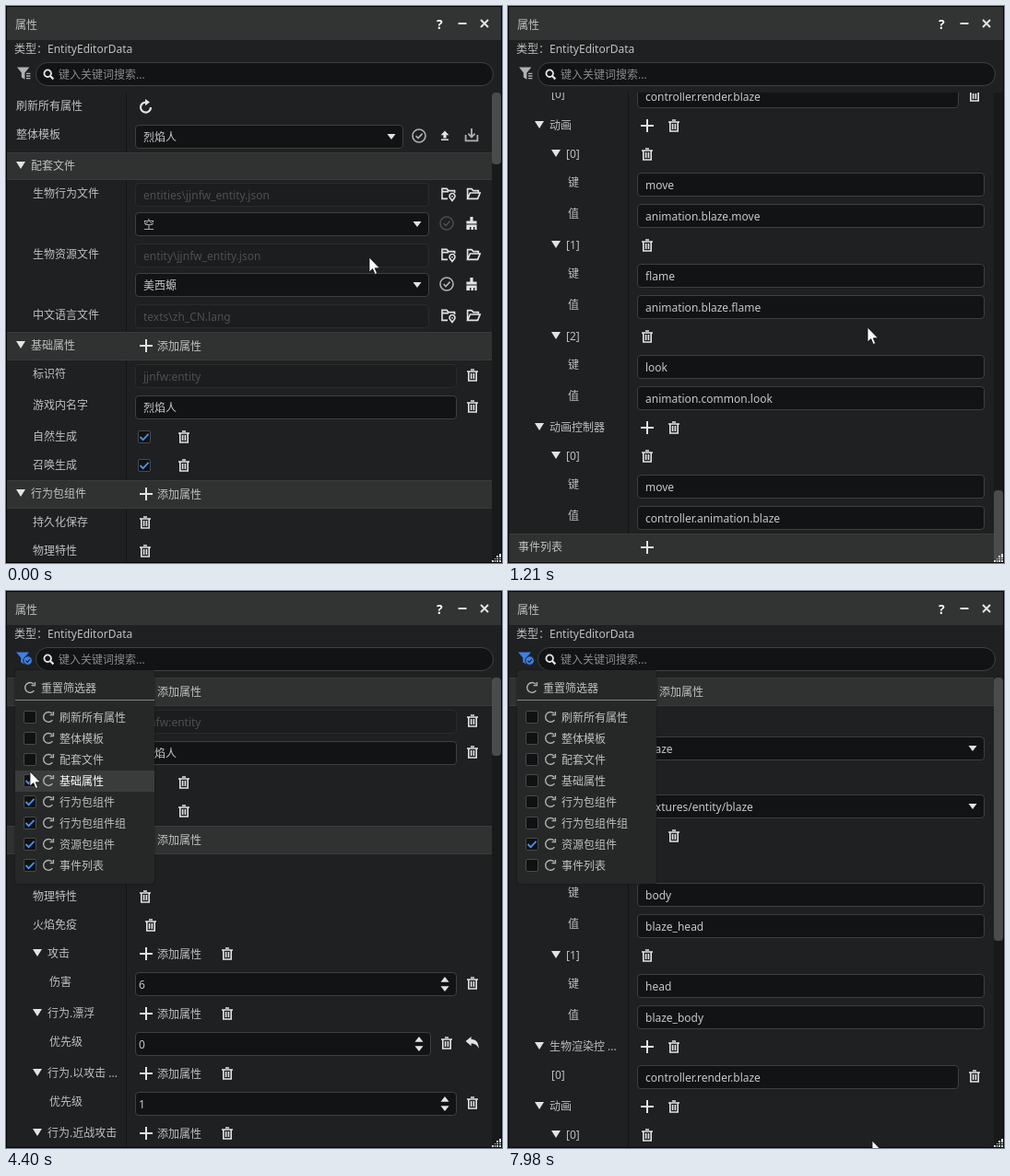
Write an HTML page that moves like this. It is 538 by 605 pixels and loops after 8 s.

```html
<!DOCTYPE html>
<html lang="zh-CN">
<head>
<meta charset="utf-8">
<title>属性</title>
<style>
html, body { margin: 0; width: 100%; height: 100%; overflow: hidden; background: #000; }
body { font: 12px/29px "Noto Sans", "Noto Sans CJK SC", "Noto Sans CJK", sans-serif; color: #bfc0c0; }
#stage { position: relative; width: 538px; height: 605px; overflow: hidden; background: #1e2021; }
#stage div, #stage span, #stage svg { position: absolute; box-sizing: border-box; white-space: nowrap; }
#frame { inset: 0; border: 1px solid #050606; }
#bar { left: 1px; top: 1px; width: 536px; height: 36px; background: #323333; }
#search { left: 32px; top: 61px; width: 497px; height: 26px; border: 1px solid #404242; border-radius: 13px; background: #121314; color: #8a8c8c; line-height: 25px; padding-left: 24px; }
#view { left: 1px; top: 94px; width: 536px; height: 510px; overflow: hidden; }
#list { left: -1px; top: 0; width: 528px; }
#list .group, #list .row { position: relative; }
#list .row::before { content: ""; position: absolute; left: 130px; top: 0; bottom: 0; width: 1px; background: #131515; }
#list .head { background: #303131; box-shadow: inset 0 1px #3a3b3b, inset 0 -1px #3a3b3b; }
#list .head::before { display: none; }
#track { left: 526px; top: 0; width: 10px; height: 510px; background: #181a1a; }
#thumb { left: 0; top: 0; width: 10px; border-radius: 4px; background: #4a4b4b; }
.field { left: 140px; height: 26px; border: 1px solid #3e4040; border-radius: 4px; background: #121314; color: #c6c8c8; line-height: 25px; padding-left: 8px; }
.field.spin { padding-left: 3px; }
.field.off { background: #1b1d1e; border-color: #292b2b; color: #4e5050; }
.box { width: 14px; height: 14px; border: 1px solid #484a4a; border-radius: 2px; background: #101112; color: #4a90f0; }
.box.clear svg { display: none; }
.i { width: 20px; height: 20px; fill: none; stroke: currentColor; stroke-width: 1.6; color: #e2e3e3; overflow: visible; }
.i.dim { color: #4b4d4d; }
.i.mid { color: #b0b2b2; }
.box .i { color: inherit; }
#menu { left: 10px; top: 86px; width: 151px; height: 232px; border-radius: 4px; background: #262827; box-shadow: 0 0 2px #111; }
#menu .rule { left: 0; top: 32px; width: 151px; height: 1px; background: #858787; }
.item { left: 0; width: 151px; height: 23px; line-height: 24px; }
.item.hot { background: #3a3c3c; color: #fff; }
#spot { width: 24px; height: 24px; border-radius: 50%; background: rgba(216, 206, 28, .72); }
</style>
</head>
<body>
<div id="stage"></div>
<svg width="0" height="0" style="position:absolute">
  <defs>
    <symbol id="trash" viewBox="-10 -10 20 20"><path d="M-2-6H2M-6-4H6M-4.2-4V6H4.2V-4M-1.4-2V4M1.4-2V4"/></symbol>
    <symbol id="plus" viewBox="-10 -10 20 20"><path d="M-7 0H7M0-7V7" stroke-width="2"/></symbol>
    <symbol id="refresh" viewBox="-10 -10 20 20"><path d="M1-4.4A5.5 5.5 0 1 0 6 1" stroke-width="2.2"/><path d="M0-8L5-4.4 0-.8Z" fill="currentColor" stroke="none"/></symbol>
    <symbol id="reset" viewBox="-10 -10 20 20"><path d="M4-3.8A5.4 5.4 0 1 0 4.4 3.2M5.4-6V-2.4H1.6" stroke-width="1.4"/></symbol>
    <symbol id="fold" viewBox="-10 -10 20 20"><path d="M-5-4H5L0 4Z" fill="currentColor" stroke="none"/></symbol>
    <symbol id="down" viewBox="-10 -10 20 20"><path d="M-4.5-3H4.5L0 3Z" fill="currentColor" stroke="none"/></symbol>
    <symbol id="steps" viewBox="-10 -10 20 20"><path d="M-4.5-2.2L0-8 4.5-2.2ZM-4.5 2.2L0 8 4.5 2.2Z" fill="currentColor" stroke="none"/></symbol>
    <symbol id="tick" viewBox="-10 -10 20 20"><path d="M-4.5 0L-1.4 3.2 4.6-3.2" stroke-width="1.8"/></symbol>
    <symbol id="okay" viewBox="-10 -10 20 20"><circle r="7"/><path d="M-3.4 0L-1 2.6 3.6-2.4"/></symbol>
    <symbol id="up" viewBox="-10 -10 20 20"><path d="M0-5.4L4.4-.8H1.6V2.4H-1.6V-.8H-4.4ZM-4 3.6H4V5H-4Z" fill="currentColor" stroke="none"/></symbol>
    <symbol id="save" viewBox="-10 -10 20 20"><path d="M-6.4-1V5.4H6.4V-1M0-8V1M-3.6-2.4L0 1.4 3.6-2.4" stroke-width="1.8"/></symbol>
    <symbol id="place" viewBox="-10 -10 20 20"><path d="M-1 5.4H-7V-5.6H-2L0-3.4H6.6V-1M-7-2.4H0"/><path d="M4 7.4L1.4 4A3 3 0 1 1 6.6 4ZM4 2V3.4"/></symbol>
    <symbol id="open" viewBox="-10 -10 20 20"><path d="M-6.4 5.4V-5.4H-2L0-3.4H5.4V-1M-6.4 5.4L-3.6-1H7.2L4.6 5.4Z"/></symbol>
    <symbol id="brush" viewBox="-10 -10 20 20"><path d="M-1.6-7H1.6V-2.4H5.6V.4H-5.6V-2.4H-1.6ZM-5.6 1.4H5.6V7H3.4V4H2V7H-.6V4H-2V7H-5.6Z" fill="currentColor" stroke="none"/></symbol>
    <symbol id="undo" viewBox="-10 -10 20 20"><path d="M-7.4-2L-1.4-7V-4C4-4 6.6-.6 6.8 6 5 2 2.6.4-1.4.4V3.2Z" fill="currentColor" stroke="none"/></symbol>
    <symbol id="lens" viewBox="-10 -10 20 20"><circle cx="-.8" cy="-.8" r="3.8" stroke-width="1.8"/><path d="M2 2L5.4 5.4" stroke-width="2.2"/></symbol>
    <symbol id="minus" viewBox="-10 -10 20 20"><path d="M-4.5 0H4.5" stroke-width="2"/></symbol>
    <symbol id="close" viewBox="-10 -10 20 20"><path d="M-4-4L4 4M4-4L-4 4" stroke-width="2"/></symbol>
    <symbol id="funnel" viewBox="-10 -10 20 20"><path d="M-7-6.6H6.4L1.4-.6V6.8L-2.2 4.4V-.6Z" fill="currentColor" stroke="none"/><path d="M3 .4H7.4M3 3H7.4M3 5.6H7.4" stroke-width="1.4"/></symbol>
    <symbol id="filtered" viewBox="-10 -10 20 20"><path d="M-8-6.6H6L1-.6V6.6L-2.8 4.4V-.6Z" fill="currentColor" stroke="none"/><circle cx="4.6" cy="2.6" r="4.8" fill="currentColor" stroke="#1e2021" stroke-width="1"/><path d="M2.4 2.6L4.2 4.4 7 1.2" stroke="#1e2021" stroke-width="1.2"/></symbol>
  </defs>
</svg>
<script>
const at = (x, y) => `left:${x}px;top:${y}px`;
const icon = (name, x, y = 15, cls = '') =>
  `<svg class="i ${cls}" style="${at(x - 10, y - 10)}"><use href="#${name}"/></svg>`;
const text = (s, x, y, css = '') => `<span style="${at(x, y - 14.5)};${css}">${s}</span>`;
const field = (right, s, cls = '', y = 17, mark = '') =>
  `<div class="field ${cls}" style="top:${y - 13}px;width:${right - 140}px">${s}</div>` +
  (mark && icon(mark, right - (mark === 'down' ? 13.5 : 13), y));
const combo = (right, s, y) => field(right, s, '', y, 'down');
const box = (x, y) => `<div class="box" style="${at(x - 7, y - 7)}">${icon('tick', 6, 6)}</div>`;
const trash = (x, y) => icon('trash', x, y);
const addBtn = icon('plus', 152) + text('添加属性', 164, 15.5);

// Rows: a label indented by depth, with or without a fold arrow
const row = (h, depth, label, body = '', fold = false, cls = '') =>
  `<div class="row ${cls}" style="height:${h}px">` +
  (fold ? icon('fold', 16 + 18 * depth, 14) : '') +
  text(label, (fold ? 27 : 11) + 18 * depth, 14.5) + body + '</div>';
const head = (label, body = '', fold = true, h = 31) => row(h, 0, label, body, fold, 'head');
const node = (label, depth = 1, body = addBtn + trash(240)) => row(31, depth, label, body, true);
const array = (label, depth = 1) => node(label, depth, icon('plus', 151) + trash(180));
const leaf = (label, x = 151) => row(31, 1, label, trash(x));
const flag = (label, depth) => row(31, depth, label, box(150, 15) + trash(193));
const edit = (label, depth, s, cls) => row(34, depth, label, field(489, s, cls) + trash(506, 16));
const pick = (label, s) => row(34, 3, label, combo(489, s) + trash(506, 16));
const wide = (label, s) => row(32, 2, label, combo(517, s, 15));
const spin = (label, s, undo) => row(34, 2, label, undo
  ? field(461, s, 'spin', 17, 'steps') + trash(478, 16) + icon('undo', 506, 16)
  : field(489, s, 'spin', 17, 'steps') + trash(506, 16));
const pair = (n, key, val) => node(`[${n}]`, 2, trash(151)) +
  row(34, 3, '键', field(517, key)) + row(34, 3, '值', field(517, val));
const file = (label, path, choice, tint) => row(choice ? 66 : 33, 1, label,
  field(459, path, 'off', 16) + icon('place', 480) + icon('open', 507) +
  (choice ? combo(459, choice, 48) + icon('okay', 478, 47, tint) + icon('brush', 505, 47) : ''));

const chase = ['追赶最 ...', '随机走动', '随机飞行', '看向玩家', '随机张望', '受伤反击', '远程攻击', '返回领地'];
const names = ['刷新所有属性', '整体模板', '配套文件', '基础属性', '行为包组件', '行为包组件组', '资源包组件', '事件列表'];
const groups = [
  row(31, 0, names[0], icon('refresh', 151)),
  row(34, 0, names[1], combo(431, '烈焰人') + icon('okay', 448, 16, 'mid') + icon('up', 476, 16) + icon('save', 505, 16, 'mid')),
  head(names[2], '', true, 30) +
    file('生物行为文件', 'entities\\jjnfw_entity.json', '空', 'dim') +
    file('生物资源文件', 'entity\\jjnfw_entity.json', '美西螈', 'mid') +
    file('中文语言文件', 'texts\\zh_CN.lang'),
  head(names[3], addBtn) + edit('标识符', 1, 'jjnfw:entity', 'off') + edit('游戏内名字', 1, '烈焰人') +
    flag('自然生成', 1) + flag('召唤生成', 1),
  head(names[4], addBtn) + leaf('持久化保存') + leaf('物理特性') + leaf('火焰免疫', 157) +
    node('攻击') + spin('伤害', 6) + node('行为.漂浮') + spin('优先级', 0, true) +
    node('行为.以攻击 ...') + spin('优先级', 1) +
    node('行为.近战攻击') + spin('优先级', 3, true) + spin('随机停止间隔', 2) + spin('移速倍数', '1.00') + flag('追逐目标', 2) +
    chase.map((s, i) => node('行为.' + s) + spin('优先级', i + 2) + spin('移速倍数', '1.00') + flag('追逐目标', 2)).join('') +
    leaf('碰撞箱') + leaf('生命值') +
    row(31, 1, '移动.基础', addBtn + trash(240)) + row(31, 1, '可被命名', addBtn + trash(240)) +
    node('导航.行走') + flag('可以涉水', 2) + node('射手') + edit('定义', 2, 'minecraft:small_fireball') +
    node('科系') + array('科系', 2) + pick('[0]', 'blaze') + pick('[1]', 'monster') + pick('[2]', 'mob'),
  head(names[5], icon('plus', 151), false),
  head(names[6], addBtn) + node('模型', 1, '') + wide('default', 'blaze') +
    node('纹理', 1, '') + wide('default', 'textures/entity/blaze') +
    array('部件显示') + pair(0, 'body', 'blaze_head') + pair(1, 'head', 'blaze_body') +
    array('生物渲染控 ...') + edit('[0]', 2, 'controller.render.blaze') +
    array('动画') + pair(0, 'move', 'animation.blaze.move') + pair(1, 'flame', 'animation.blaze.flame') + pair(2, 'look', 'animation.common.look') +
    array('动画控制器') + pair(0, 'move', 'controller.animation.blaze'),
  head(names[7], icon('plus', 151), false)
];

let grip = '';
for (let r = 0; r < 4; r++)
  for (let c = 0; c <= r; c++)
    grip += `<div style="${at(535 - 2.6 * c, 595 + 2.4 * r)};width:1.5px;height:1.5px;background:#ddd"></div>`;

const stage = document.getElementById('stage');
stage.innerHTML = `
  <div id="bar">${text('属性', 9, 19.5)}${text('?', 466, 18.5, 'font-weight:700;font-size:14px;color:#fff')}
    ${icon('minus', 494, 18)}${icon('close', 518, 18)}</div>
  ${text('类型：EntityEditorData', 9, 46.5)}
  <div id="plain">${icon('funnel', 19, 73, 'mid')}</div>
  <div id="active">${icon('filtered', 19, 73)}</div>
  <div id="search">${icon('lens', 13, 12)}键入关键词搜索...</div>
  <div id="view"><div id="list">${groups.map(g => `<div class="group">${g}</div>`).join('')}</div>
    <div id="track"><div id="thumb"></div></div></div>
  <div id="frame"></div>${grip}
  <div id="menu">${icon('reset', 16, 19, 'mid')}${text('重置筛选器', 28, 19.5)}<div class="rule"></div>
    ${names.map((s, i) => `<div class="item" style="top:${40 + 23 * i}px">${box(16, 11)}${icon('reset', 36, 11, 'mid')}
      <span style="left:48px">${s}</span></div>`).join('')}</div>
  <div id="spot"></div>
  <svg id="cursor" width="14" height="21" viewBox="-1 -1 14 21">
    <path d="M0 0V16L3.7 12.6 6.2 18.4 8.6 17.4 6.2 11.8H11.3Z" fill="#fff" stroke="#111" stroke-width=".8"/></svg>`;

const $ = id => document.getElementById(id);
const all = sel => [...stage.querySelectorAll(sel)];
const blocks = all('.group'), items = all('.item');
const heights = blocks.map(b => b.offsetHeight);
$('active').firstElementChild.style.color = '#3d80ea';

// Held values: [start ms, ...]
const path = [
  [0, 394, 273], [130, 393, 272], [270, 394, 276], [550, 396, 284], [810, 397, 290], [940, 396, 310],
  [1080, 393, 330], [1210, 390, 349], [1350, 382, 360], [1480, 375, 367], [1620, 130, 120], [1750, 44, 66],
  [1890, 20, 72], [2150, 21, 78], [2300, 24, 82], [2430, 27, 115], [2560, 30, 190], [2690, 30, 288],
  [2950, 30, 240], [3080, 28, 180], [3210, 27, 137], [3620, 26, 160], [4010, 26, 183], [4400, 26, 196],
  [4660, 26, 206], [4920, 27, 230], [5050, 27, 251], [5730, 26, 283], [6530, 27, 318], [6660, 27, 300],
  [7060, 18, 262], [7190, 24, 230], [7700, 120, 335], [7830, 232, 447], [7980, 395, 597]
];
const scrolls = [[0, 0], [270, 300], [400, 700], [550, 1150], [680, 1600], [810, 2002], [940, 2400],
  [1080, 2700], [1210, 2820], [1620, 1100], [1750, 0]];
const fades = [[0, 0], [2020, .35], [2150, .72], [2300, 1]];
// Clicks: press, effect, menu item
const clicks = [[3340, 3470, 0], [3620, 3750, 1], [4140, 4270, 2], [4660, 4790, 3], [5330, 5470, 5], [6800, 6930, 7], [7310, 7440, 4]];
const held = (steps, t) => steps.filter(s => s[0] <= t).pop();

function draw(t) {
  const [, x, y] = held(path, t), fade = held(fades, t)[1];
  const hidden = new Set(clicks.filter(c => t >= c[1]).map(c => c[2]));
  const total = heights.reduce((sum, h, i) => sum + (hidden.has(i) ? 0 : h), 0);
  const scroll = Math.min(held(scrolls, t)[1], total - 510);
  const hot = fade === 1 && x >= 10 && x <= 160 ? Math.floor((y - 126) / 23) : -1;
  blocks.forEach((b, i) => b.style.display = hidden.has(i) ? 'none' : 'block');
  items.forEach((el, i) => {
    el.classList.toggle('hot', i === hot);
    el.firstElementChild.classList.toggle('clear', hidden.has(i));
  });
  $('list').style.transform = `translateY(${-scroll}px)`;
  $('thumb').style.height = 510 * 510 / total + 'px';
  $('thumb').style.top = 510 * scroll / total + 'px';
  $('menu').style.opacity = fade;
  $('plain').style.display = hidden.size ? 'none' : 'block';
  $('active').style.display = hidden.size ? 'block' : 'none';
  const press = clicks.find(c => t >= c[0] && t < c[1]);
  $('spot').style.cssText = press ? at(x - 13, y - 12) : 'display:none';
  $('cursor').style.cssText = at(x - 1, y - 1);
}

const start = performance.now();
(function tick() {
  draw((performance.now() - start) % 8000);
  requestAnimationFrame(tick);
})();
</script>
</body>
</html>
```
